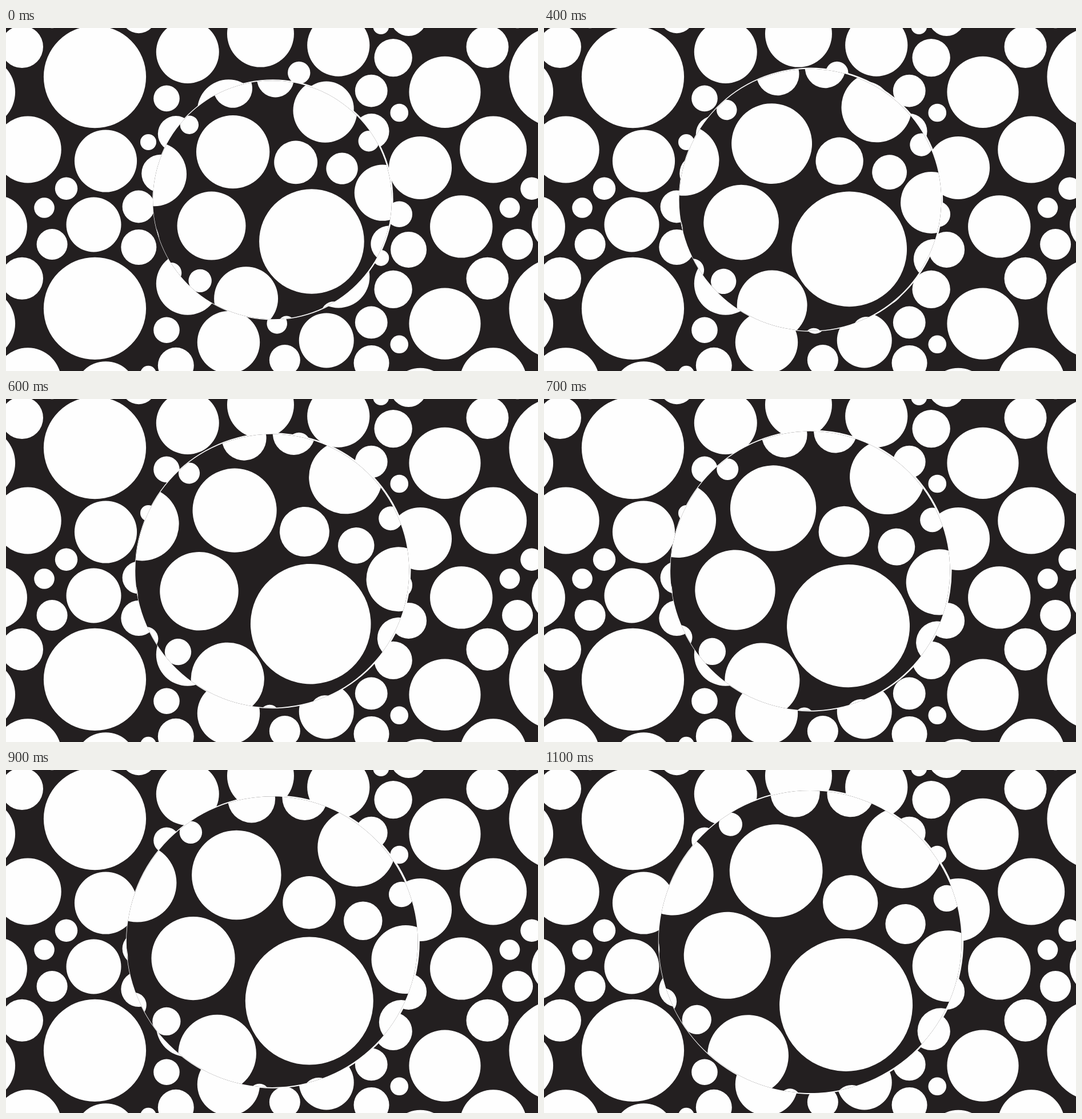
Animation, 931 px wide and 601 px high, one loop 1200 ms. Source, as an HTML page with a canvas:

```html
<!DOCTYPE html>
<html lang="en">
<head>
<meta charset="utf-8">
<title>Turning disc of dots</title>
<style>
  html, body { margin: 0; width: 100%; height: 100%; overflow: hidden; background: #231f20; }
  canvas { display: block; }
</style>
</head>
<body>
<canvas id="stage" width="931" height="601"></canvas>
<script>
const ctx = document.getElementById('stage').getContext('2d');
const DARK = '#231f20', LIGHT = '#fefefe';
const HALF_W = 407.25, HALF_H = 202.9, RADIUS = 205.5;
const STEP = 100, STEPS = 12;

// One motif of dots (x, y, radius), repeated on a staggered lattice
const motif = [
  [155.5, 85.6, 89.6], [281, 123.4, 22.8], [317.8, 42, 55], [174.5, 233, 54.6],
  [38.2, 213, 58.5], [28, 33, 37], [-46.5, 112.3, 62.6], [105.5, 281.3, 19.7],
  [67, 315, 17.8], [153.5, 344.5, 48], [80.6, 379, 27], [232, 313, 28.4],
  [232.3, 384, 31], [249, 200, 14], [389.5, 145, 54.7], [270.4, 255, 33.2],
  [281, 351.4, 15.8], [297.3, 185.5, 31.5]
];

function circle(x, y, r) {
  ctx.moveTo(x + r, y);
  ctx.arc(x, y, r, 0, 2 * Math.PI);
}

function fillCircle(x, y, r, colour) {
  ctx.beginPath();
  circle(x, y, r);
  ctx.fillStyle = colour;
  ctx.fill();
}

function pattern() {
  ctx.beginPath();
  for (let col = -2; col <= 2; col++)
    for (let row = -3; row <= 3; row++)
      if ((col + row) % 2 === 0)
        for (const [x, y, r] of motif) circle(x + col * HALF_W, y + row * HALF_H, r);
  ctx.fillStyle = LIGHT;
  ctx.fill();
}

// The dark face sits slightly off centre on a light disc, leaving an uneven rim
function disc(step) {
  const scale = 1 + 0.025 * step;
  ctx.save();
  ctx.translate(467, 300.8);
  ctx.rotate((55 + 1.25 * step) * Math.PI / 180);
  ctx.scale(scale, scale);
  fillCircle(0, 0, RADIUS, LIGHT);
  fillCircle(-0.2, 1, RADIUS - 1.6, DARK);
  ctx.clip();
  ctx.translate(-59.3, -101);
  pattern();
  ctx.restore();
}

function draw() {
  const step = Math.floor(performance.now() / STEP) % STEPS + 1;
  ctx.fillStyle = DARK;
  ctx.fillRect(0, 0, 931, 601);
  pattern();
  disc(step);
  requestAnimationFrame(draw);
}
draw();
</script>
</body>
</html>
```
